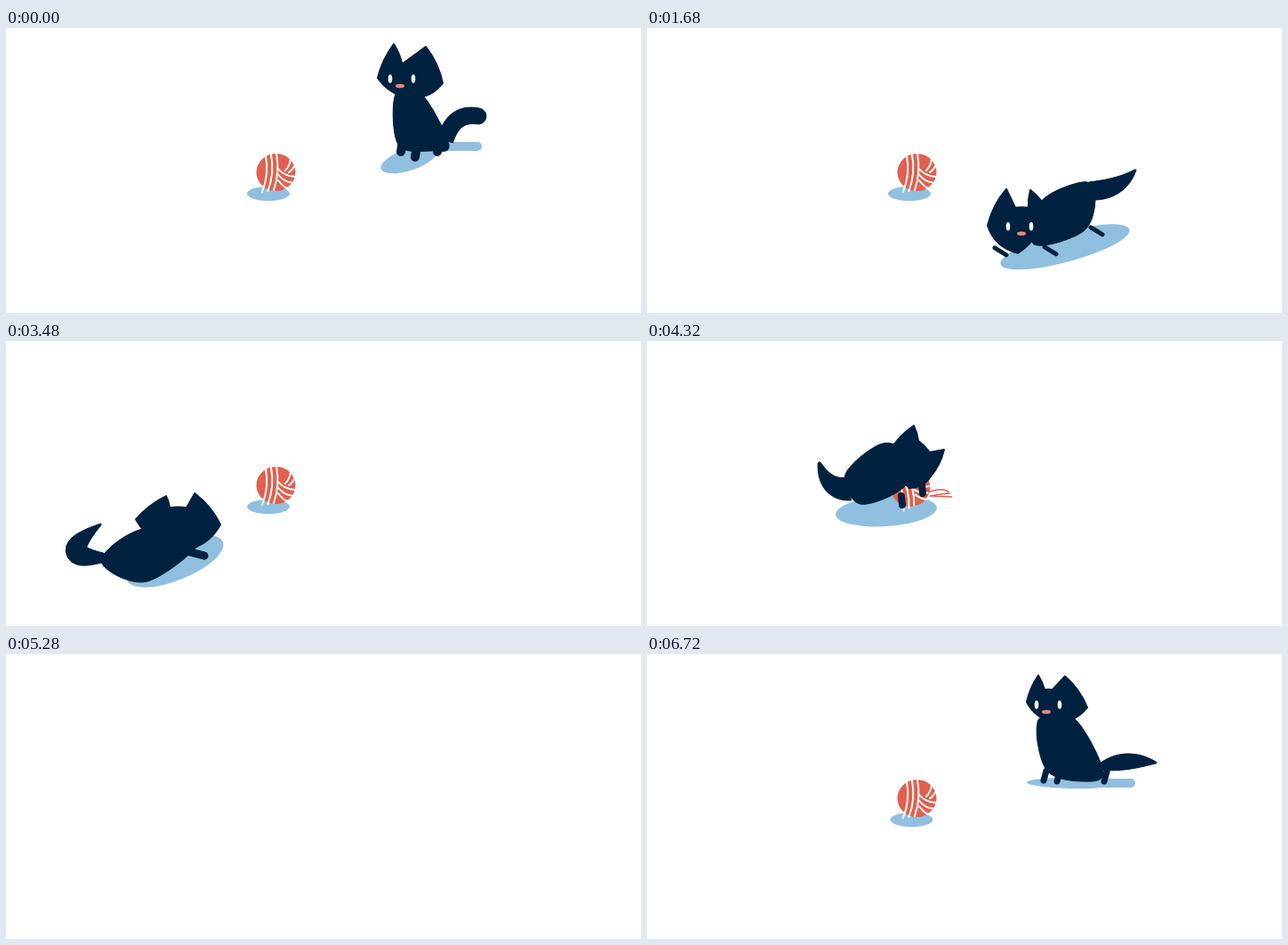
An HTML page that plays this animation: 714 px wide and 320 px high, repeating every 6.84 s.

```html
<!DOCTYPE html>
<html lang="en">
<head>
<meta charset="utf-8">
<title>Cat and yarn</title>
<style>
  html, body { margin: 0; width: 100%; height: 100%; overflow: hidden; background: #fff; }
  svg { display: block; width: 714px; height: 320px; }
  #cat { fill: #00213f; stroke: #00213f; stroke-linejoin: round; stroke-linecap: round; }
  #head { stroke-width: 2; }
  #face { stroke: none; }
  .shade { fill: #91bfe0; }
  #trail { stroke: #91bfe0; stroke-width: 10; stroke-linecap: round; }
  .yarn { fill: #e1604f; }
  #strands { fill: none; stroke: #fff; stroke-width: 2; stroke-linecap: round; }
  #thread { fill: none; stroke: #e1604f; stroke-width: 1.4; }
</style>
</head>
<body>
<svg viewBox="0 0 714 320">
  <ellipse id="ballShade" class="shade" cx="295" cy="186" rx="24" ry="8"/>
  <g id="shadow"><ellipse id="pool" class="shade"/><path id="trail"/></g>
  <g id="ball">
    <g id="spin"><ellipse class="yarn" cx="303.5" cy="162" rx="22" ry="21"/><path id="strands"/></g>
    <path id="thread" d="M323 167Q342 160 347 168Q335 169 325 171L350 172"/>
  </g>
  <g id="cat">
    <path id="tail"/><path id="body"/><path id="legs"/><path id="head"/>
    <g id="face">
      <ellipse fill="#fff" cx="-13" rx="2.3" ry="4.8"/>
      <ellipse fill="#fff" cx="13" rx="2.3" ry="4.8"/>
      <ellipse fill="#e8857b" cx="-2" cy="8" rx="5" ry="2.3"/>
    </g>
  </g>
</svg>
<script>
const $ = id => document.getElementById(id);
const set = (id, attrs) => { for (const k in attrs) $(id).setAttribute(k, attrs[k]); };
const pts = text => text.split(" ").map(p => p.split(",").map(Number));

// head: ear, dip, dip, ear, cheek, chin, cheek; tail: x, y, half width; shadow: centre, radii, tilt.
const poses = {
  sit: {
    head: "436,18 445,39 446,40 472,21 491,62 453,78 418,56", body: "438,74 441,131 478,138 498,131 468,75",
    tail: "494,126,9 503,94,10 531,99,9", shadow: [453, 148, 33, 12, -18], trail: "M480 133H530",
    feet: "444,139 460,145 485,139", knee: [2, -13], legWidth: 10, face: [445, 57]
  },
  alert: {
    head: "440,24 447,40 456,40 470,25 495,60 455,76 427,54", body: "440,74 449,130 490,143 513,132 480,72",
    tail: "510,127,4 539,117,15 572,122,1", shadow: [478, 145, 51, 6, 1], trail: "M490 145H544",
    feet: "446,142 461,143 514,143", knee: [3, -11], legWidth: 7, face: [451, 57]
  },
  run: {
    head: "529,129 531,149 546,149 556,128 577,169 543,200 511,150", body: "525,190 470,176 456,140 468,120 517,142",
    tail: "462,130,10 431,130,13 411,107,1", shadow: [490, 193, 75, 17, 15],
    feet: "448,179 500,201 556,202", knee: [13, -8], legWidth: 5, face: [541, 170]
  },
  back: {
    head: "145,139 151,167 153,167 186,149 198,201 155,215 114,183", body: "126,205 127,252 205,280 218,262 181,212",
    tail: "212,275,7 242,281,16 273,275,1", shadow: [167, 288, 56, 17, 20],
    feet: "133,273 153,275 178,289 195,287", knee: [-8, -14], legWidth: 7
  },
  stalk: {
    head: "182,174 186,187 205,187 214,171 243,206 195,235 148,200", body: "222,221 160,270 109,247 155,211",
    tail: "112,243,5 52,245,21 108,206,1", shadow: [192, 247, 58, 21.5, -22],
    feet: "225,241", knee: [-19, -5], legWidth: 9
  },
  pounce: {
    head: "300,95 305,112 318,125 334,122 319,152 295,165 275,120", body: "290,163 240,183 223,150 262,116 290,125",
    tail: "228,166,13 203,168,12 194,138,2", shadow: [269, 191, 57, 17, -4],
    feet: "287,184 310,171", knee: [-1, -10], legWidth: 8
  }
};

// A chain of arcs, each bowed outward by its share of the edge length.
function bowed(points, bows) {
  return "M" + points[0] + points.map(([x, y], i) => {
    const [nx, ny] = points[(i + 1) % points.length], dx = nx - x, dy = ny - y;
    return `Q${(x + nx) / 2 + dy * bows[i]} ${(y + ny) / 2 - dx * bows[i]} ${nx} ${ny}`;
  }).join("") + "Z";
}
const HEAD_BOWS = [.08, .08, 0, .12, .28, .22, .1];

// A closed Catmull-Rom curve through the points.
function smooth(points) {
  const at = i => points[(i + points.length) % points.length];
  const handle = (i, sign) => at(i).map((v, k) => v + sign * (at(i + 1)[k] - at(i - 1)[k]) / 6);
  return "M" + points[0] + points.map((p, i) => `C${handle(i, 1)} ${handle(i + 1, -1)} ${at(i + 1)}`).join("") + "Z";
}

// A ribbon along a quadratic curve whose half width follows the same curve.
function ribbon([a, b, c], steps = 16) {
  const left = [], right = [];
  for (let i = 0; i <= steps; i++) {
    const u = i / steps, v = 1 - u;
    const [x, y, w] = a.map((_, k) => v * v * a[k] + 2 * u * v * b[k] + u * u * c[k]);
    const [dx, dy] = a.map((_, k) => v * (b[k] - a[k]) + u * (c[k] - b[k]));
    const s = w / Math.hypot(dx, dy);
    left.push([x - dy * s, y + dx * s]);
    right.unshift([x + dy * s, y - dx * s]);
  }
  return `M${left.join("L")}A${c[2]} ${c[2]} 0 0 0 ${right.join("L")}Z`;
}

const REST = 303, RADIUS = 22, LOOP = 6840;
const act = (at, pose, from = [0, 0], to = from, more = {}) =>
  ({ at, pose, from, to, pow: 1, lift: 0, squash: 0, scale: 1, ...more });
const flip = { flip: true };

const acts = [
  act(0, "sit", [0, 0], [0, 4], { squash: .15 }),
  act(420, "run", [-8, -28], [-8, -28], { flip: true, scale: .82 }),
  act(600, "run", [-20, -14], [0, 0]),
  act(840, "run", [0, 0], [0, 0], { squash: .1 }),
  act(1440, "run", [4, 15], [-50, 100], flip),
  act(1980, "run", [-106, 88], [-276, 80], flip),
  act(2220, "back", [25, 0], [0, 0]),
  act(2340, "back", [0, 0], [0, 0], { squash: .08 }),
  act(2880, "stalk", [-24, 0], [-28, 0], flip),
  act(3240, "stalk", [0, 0], [-40, 3], { pow: 3 }),
  act(3900, "pounce", [-90, 55], [0, 0], { pow: .5, lift: 60 }),
  act(4320, "pounce", [0, 0], [550, -6], { pow: 1.4, lift: -12, held: true }),
  act(5280, null, [0, 0], [0, 0], { gone: true }),
  act(5880, null, [387, 0], [0, 0], { pow: .8, rolling: true }),
  act(6360, "run", [204, -35], [74, -45], flip),
  act(6600, "alert", [45, 12], [0, 0]),
  act(6720, "alert"),
  act(LOOP)
];

// The picture advances in steps of 120 ms; these ones are held longer.
const HELD = [0, 420, 1080, 1260, 1800, 2580, 2880, 3060, 3720, 4140];
function stepStart(time) {
  let t = 0;
  for (let next = 0; next <= time; next += HELD.includes(t) ? 180 : 120) t = next;
  return t;
}

const show = (id, on) => { $(id).style.display = on ? "" : "none"; };

function drawCat(a, x, y, lift, u) {
  const pose = poses[a.pose];
  show("cat", pose);
  show("shadow", pose);
  if (!pose) return;
  const [cx, cy, rx, ry, tilt] = pose.shadow;
  const place = up => `translate(${cx + x} ${cy + y - up}) scale(${a.flip ? -a.scale : a.scale} ${
    a.scale * (1 - a.squash * u)}) translate(${-cx} ${-cy})`;
  set("cat", { transform: place(lift) });
  set("shadow", { transform: place(0) });
  set("pool", { cx, cy, rx, ry, transform: `rotate(${tilt} ${cx} ${cy})` });
  set("trail", { d: pose.trail || "" });
  set("head", { d: bowed(pts(pose.head), HEAD_BOWS) });
  set("body", { d: smooth(pts(pose.body)) });
  set("tail", { d: ribbon(pts(pose.tail)) });
  set("legs", { d: pts(pose.feet).map(foot => `M${foot}l${pose.knee}`).join(""), "stroke-width": pose.legWidth });
  show("face", pose.face);
  if (pose.face) set("face", { transform: `translate(${pose.face})` });
}

function drawBall(a, x, y) {
  const dx = a.rolling ? x : a.held ? x - 7 : 0, dy = a.held ? y + 3 : 0;
  show("ball", !a.gone);
  show("ballShade", !a.gone && !a.held);
  show("thread", a.held);
  set("ball", { transform: `translate(${dx} ${dy})` });
  set("spin", { transform: `rotate(${dx / RADIUS * 180 / Math.PI} ${REST} 162)` });
  set("ballShade", { transform: `translate(${dx + (a.at > 5280 ? 2.5 : 0)} 0)` });
}

function windYarn() {
  let d = "M320 147q-1 8-6 13M326 152q-4 8-8 10";
  for (let i = 0; i < 3; i++)
    d += `M${292 + 6 * i} ${143 - i}q4 21 ${i / 2 - 4} 41M306 ${158 + 6.5 * i}q6 8 ${19 - 4 * i} 9`;
  set("strands", { d });
}

function render(time) {
  const t = stepStart(time);
  const i = acts.findIndex(a => a.at > t) - 1, a = acts[i];
  const u = (t - a.at) / (acts[i + 1].at - a.at);
  const [x, y] = a.from.map((v, k) => v + (a.to[k] - v) * u ** a.pow);
  const lift = a.lift * Math.sin(Math.PI * u);
  drawCat(a, x, y, lift, u);
  drawBall(a, x, y - lift);
}

const start = performance.now();
function tick() {
  render((performance.now() - start) % LOOP);
  requestAnimationFrame(tick);
}
windYarn();
tick();
</script>
</body>
</html>
```
